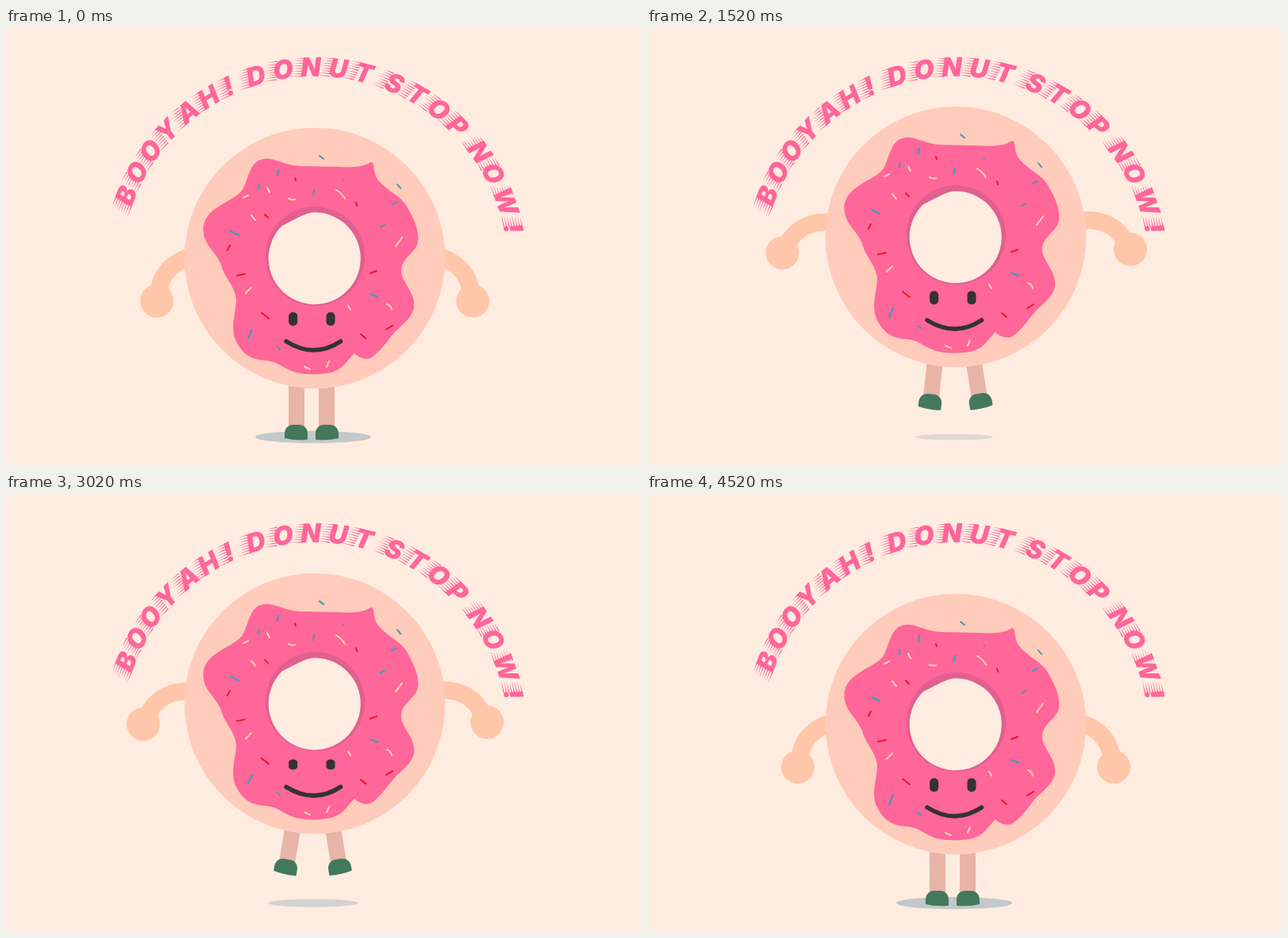
Write an HTML page that moves like this. It is 800 by 552 pixels and loops after 4620 ms.

```html
<!DOCTYPE html>
<html lang="en">
<head>
<meta charset="utf-8">
<title>Donut jump</title>
<style>
  html, body { margin: 0; width: 100%; height: 100%; overflow: hidden; background: #ffece0; }
  svg { display: block; width: 100%; height: 100%; }
  .arm { fill: none; stroke: #ffc6a9; stroke-width: 22; }
  .hand { fill: #ffc6a9; }
  .leg { fill: #e8b4a8; }
  .shoe { fill: #42795c; }
  .sprinkles path { fill: none; stroke-width: 2; stroke-linecap: round; }
  .ink { fill: #333; }
  .title { fill: #ff6699; font: italic 900 33px Inter, Roboto, sans-serif; text-anchor: middle; }
</style>
</head>
<body>
<svg viewBox="0 0 800 552">
  <defs>
    <g id="armShape">
      <path class="arm" d="M246 286C214 289 194 308 192 336"/>
      <circle class="hand" cx="190" cy="344" r="21"/>
    </g>
    <g id="legShape">
      <rect class="leg" x="356" y="420" width="20" height="86"/>
      <path class="shoe" d="M351 517V512C351 504 356 500 362 500H369C376 500 380 505 380 511V518Q380 519 378 519Q364 520 351 517Z"/>
    </g>
  </defs>

  <ellipse id="shadow" cx="387" cy="515.5" fill="#c3c8ca"/>
  <g id="legs">
    <use id="legL" href="#legShape"/>
    <g transform="matrix(-1 0 0 1 770 0)"><use id="legR" href="#legShape"/></g>
  </g>
  <g id="arms">
    <use id="armL" href="#armShape"/>
    <g transform="matrix(-1 0 0 1 778 0)"><use id="armR" href="#armShape"/></g>
  </g>

  <g id="body">
    <circle cx="389" cy="290" r="164.3" fill="#ffccbb"/>
    <path fill="#ff6699" d="M325 165C340 163 350 174 374 174L420 175Q448 177 458 170Q463 166 463.5 177
      C465 187 468 192 475 198C486 208 497 213 504 223C511 236 521 252 519 269C517 284 496 290 498 308
      C500 322 516 334 514 352C511 368 497 374 485 389C477 400 467 411 461 415C454 419 445 416 439 410
      C428 421 426 428 413 433C403 437 375 438 362 433C348 428 344 421 328 419C306 418 297 409 289 393
      C282 376 290 358 290 342C289 326 274 313 271 298C263 280 248 273 248.5 252C250 226 285 220 297 205
      C306 192 306 167 325 165Z"/>
    <circle cx="389.5" cy="287.5" r="62.5" fill="#e0608f"/>
    <path fill="#ffece0" d="M389 232.3A58 58 0 1 1 347.5 249.5Q352 247 366 240Q380 232.5 389 232.3Z"/>
    <g class="sprinkles">
      <path stroke="#3a9db0" d="M395 161l5 4M343 179l-1 7M319 197l-1 5M424.500 191h.5M388 204l-1 6M493 197l4 5M486 223l5 -3
        M283 256l10 5M472 251l5 -3M459 335l9 4M310 380l-5 11M342 402l3 3"/>
      <path stroke="#f0132c" d="M364 189l1 3M326 235l4 4M441 220l1 4M282 274l-3 6M291 312l10 -2M459 309l8 -3
        M322 359l9 7M447 386l6 5M479 380l8 -5"/>
      <path stroke="#ffd3b6" d="M299 214l6 -3M329 201l3 6M356 215q4 2 8 1M416 204q7 4 11 11M309 236l5 6M499 264l-8 11
        M309 327l-7 7M480 348q5 2 6 7M431 350l3 5M376 427l7 3M407 420l-3 7"/>
    </g>
    <g class="ink">
      <g id="eyes">
        <rect x="356.200" y="358.300" width="11" height="17" rx="5"/>
        <rect x="403.500" y="358.300" width="11" height="17" rx="5"/>
      </g>
      <path d="M353 395Q388 417 421.500 395" fill="none" stroke="#333" stroke-width="5.500" stroke-linecap="round"/>
    </g>
  </g>
  <g id="title" class="title"></g>
</svg>

<script>
const LOOP = 4620;
const $ = id => document.getElementById(id);
const set = (id, name, value) => $(id).setAttribute(name, value);

const ease = {
  lin: p => p,
  in: p => p * p,
  out: p => p * (2 - p),
  io: p => (1 - Math.cos(Math.PI * p)) / 2
};

// Each key is [time, value, easing into this key].
function track(keys, t) {
  const i = keys.findIndex(key => key[0] > t);
  if (i < 0) return keys[keys.length - 1][1];
  if (i === 0) return keys[0][1];
  const [t0, v0] = keys[i - 1];
  const [t1, v1, kind = 'lin'] = keys[i];
  return v0 + (v1 - v0) * ease[kind]((t - t0) / (t1 - t0));
}

const motion = {
  bodyY: [[20, 0], [520, 15.5, 'io'], [1140, 15.5], [1840, -59, 'io'], [2320, -59],
    [3370, 15.5, 'in'], [3780, 15.5], [4520, 0, 'io']],
  squash: [[520, 1], [760, .945, 'io'], [1140, 1, 'io'], [3400, 1], [3540, .955, 'out'], [3760, 1, 'io']],
  armL: [[20, 0], [520, 6, 'io'], [720, 4], [1120, -3.7], [1520, -19.3], [1720, -33], [1820, -34, 'out'],
    [2320, -34], [3370, 6, 'in'], [3780, 6.6], [4520, 0, 'io']],
  armR: [[20, 0], [520, 9.5, 'io'], [720, 7.5], [1120, -3.7], [1520, -21.6], [1720, -38.5], [1820, -39.5, 'out'],
    [2320, -39.5], [3370, 10, 'in'], [3780, 10.4], [4520, 0, 'io']],
  legY: [[1120, 0], [1840, -65, 'io'], [2320, -65], [3420, 0, 'in']],
  legL: [[1270, 0], [1840, 15.5, 'io'], [2320, 15.5], [3420, 0, 'in']],
  legR: [[1120, 0], [1840, 15.3, 'io'], [2320, 15.3], [3420, 0, 'in']],
  shadow: [[900, 73], [1520, 49, 'io'], [1720, 37, 'out'], [2320, 37], [3370, 82, 'in'],
    [3820, 75, 'out'], [4420, 73, 'io']],
  eyes: [[2920, 1], [3020, .75], [3320, .09, 'out'], [3820, .09], [4120, 1, 'io']]
};

function buildTitle() {
  const letters = 'BOOYAH!DONUTSTOPNOW!';
  const angles = [-68.5, -61.3, -54.1, -46.7, -38.8, -31.6, -25.2, -16.9, -9, -1.1,
    6.7, 14, 23.1, 30.3, 37.7, 44.8, 54.4, 61.6, 70.3, 78.1];
  $('title').innerHTML = angles.map((angle, i) => {
    const start = letters[i] === '!' ? -2 : -8;
    let streaks = '';
    for (let k = 0; k < 8; k++) {
      const y = -23 + k * 3.2;
      const lean = -y * .2 - 2;
      const tail = start - 13 - (k * 5 % 4) + lean;
      streaks += `M${start + lean} ${y - .75}L${tail} ${y}L${start + lean} ${y + .75}Z`;
    }
    return `<g transform="translate(389 304.8) rotate(${angle}) translate(0 -243.8)">` +
      `<path d="${streaks}"/><text>${letters[i]}</text></g>`;
  }).join('');
}

function draw(t) {
  const at = name => track(motion[name], t);
  const y = at('bodyY');
  const rx = at('shadow');

  set('body', 'transform', `translate(0 ${y + 454.3}) scale(1 ${at('squash')}) translate(0 -454.3)`);
  set('eyes', 'transform', `translate(0 366.8) scale(1 ${at('eyes')}) translate(0 -366.8)`);
  set('arms', 'transform', `translate(0 ${y})`);
  set('armL', 'transform', `rotate(${-at('armL')} 280 270)`);
  set('armR', 'transform', `rotate(${-at('armR')} 280 270)`);
  set('legs', 'transform', `translate(0 ${at('legY')})`);
  set('legL', 'transform', `rotate(${at('legL')} 366 430)`);
  set('legR', 'transform', `rotate(${at('legR')} 366 410)`);
  set('shadow', 'rx', rx);
  set('shadow', 'ry', 2.4 + (rx - 41) * .165);
  set('shadow', 'opacity', Math.min(1, .4 + .6 * (rx - 41) / 32));
}

// The picture advances in steps of 100 ms after a short first step.
function frame() {
  const t = performance.now() % LOOP;
  draw(t < 20 ? 0 : Math.floor((t - 20) / 100) * 100 + 20);
  requestAnimationFrame(frame);
}

buildTitle();
frame();
</script>
</body>
</html>
```
